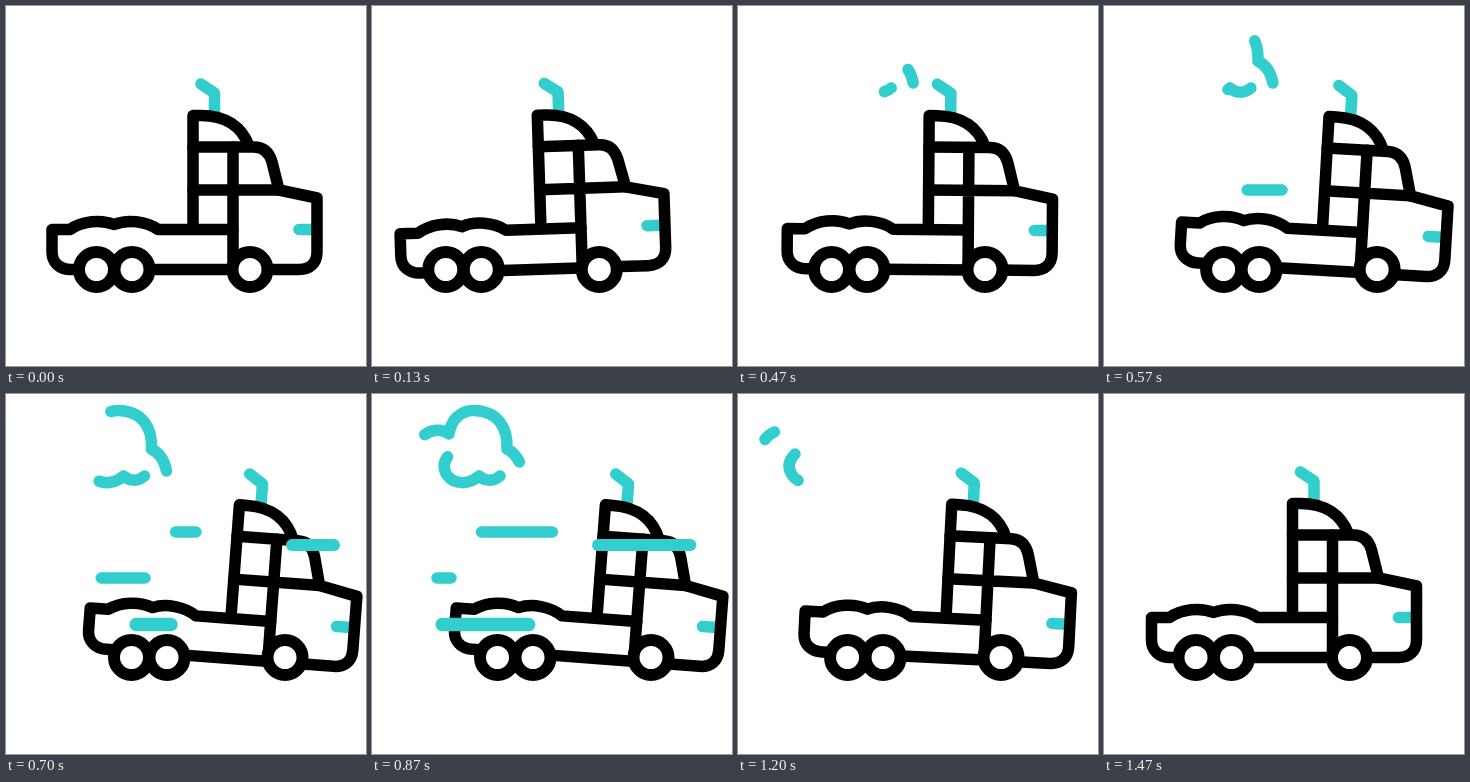
An HTML page that plays this animation: 360x360 px, repeating every 1670 ms.

```html
<!DOCTYPE html>
<html lang="en">
<head>
<meta charset="utf-8">
<title>Truck</title>
<style>
  html, body { margin: 0; width: 100%; height: 100%; overflow: hidden; background: #fff; }
  svg { display: block; width: 100vw; height: 100vh; }
  path, circle, line { fill: none; stroke-width: 11.5; stroke-linecap: round; stroke-linejoin: round; }
  .ink { stroke: #000; }
  .teal { stroke: #32cdcd; }
  .wheel { fill: #fff; stroke-width: 12; }
</style>
</head>
<body>
<svg viewBox="0 0 360 360">
  <g id="truck">
    <g id="body">
      <path class="teal" d="M195 78L208.500 87V106"/>
      <path class="teal" d="M293 223.500H308"/>
      <path class="ink" d="M187 223V109.500H195C220 109.500 236 121 243 140"/>
      <path class="ink" d="M187 141H248C258 141 263.500 147 266 156L273 184L311 192V246C311 257 304 263.500 293 263.500H256"/>
      <path class="ink" d="M187 184H273M227 141V263"/>
      <path class="ink" d="M72 263.500H65C53 263.500 46 256 46 246V223.500H64C76 215 95 213 108 218.500C121 213 140 215 152 223.500H227"/>
      <path class="ink" d="M140 263.500H232"/>
    </g>
    <circle class="ink wheel" cx="90.500" cy="263.500" r="17.500"/>
    <circle class="ink wheel" cx="126" cy="263.500" r="17.500"/>
    <circle class="ink wheel" cx="244" cy="263.500" r="17.500"/>
  </g>
  <g id="cloud">
    <path class="teal" id="puffTop" pathLength="1" d="M150 77C148 66 143 59 135 55C136 34 126 17 102 16.500C88 16.500 79 26 77 40C68 33 55 36 48 45.500"/>
    <path class="teal" id="puffLow" pathLength="1" d="M128 82C121 88 113 87 107 82C97 91 82 91 75 81C70 73 72 66 78 60"/>
  </g>
  <g id="wind"></g>
</svg>
<script>
const LOOP = 1670, STEP = 100 / 3, LAST = 44;
const $ = id => document.getElementById(id);
const clamp = x => Math.max(0, Math.min(1, x));
const span = (n, a, b) => clamp((n - a) / (b - a));
const smooth = p => p * p * (3 - 2 * p);

// Streaks: start x, end x, y, width, head start, tail start
const SPEED = 12;
const streaks = [
  [178, 65, 184, 11.5, 14.1, 17.75],
  [190, 70, 138, 11.5, 19.3, 25.2],
  [165, 40, 230.5, 13.5, 18.1, 25.3],
  [328, 215, 151, 12, 17.5, 25.2]
].map(([from, to, y, width, head, tail]) => {
  const el = document.createElementNS("http://www.w3.org/2000/svg", "line");
  el.setAttribute("class", "teal");
  el.style.strokeWidth = width;
  el.setAttribute("y1", y);
  el.setAttribute("y2", y);
  $("wind").append(el);
  return { el, from, to, head, tail };
});

function show(el, on) {
  el.setAttribute("visibility", on ? "visible" : "hidden");
}

function trim(el, start, end) {
  show(el, end > start);
  el.setAttribute("stroke-dasharray", `${Math.max(0, end - start)} 3`);
  el.setAttribute("stroke-dashoffset", -start);
}

function drawTruck(n) {
  const home = span(n, 31, 44);
  const x = -31 * smooth(span(n, 0, 7.6)) + 66 * smooth(span(n, 9, 18.8)) - 33.5 * smooth(home ** 0.76);
  const tilt = -3.1 * smooth(span(n, 0, 7)) + 7.4 * smooth(span(n, 9, 19.3)) - 4.3 * smooth(home);
  $("truck").setAttribute("transform", `translate(${x})`);
  $("body").setAttribute("transform", `rotate(${tilt} 175 262)`);
}

function drawCloud(n) {
  const grown = span(n, 12.7, 26.6);
  $("cloud").setAttribute("transform", `translate(${-2.1 * (n - 26)})`);
  trim($("puffTop"), span(n, 25.3, 36.9), grown);
  trim($("puffLow"), span(n, 28.7, 40.5), grown);
}

function drawWind(n) {
  for (const { el, from, to, head, tail } of streaks) {
    const at = begin => Math.max(to, from - SPEED * Math.max(0, n - begin));
    const left = at(head), right = at(tail);
    show(el, left < right);
    el.setAttribute("x1", left);
    el.setAttribute("x2", right);
  }
}

function render(ms) {
  const n = Math.min(LAST, Math.floor((ms + 3.4) / STEP));
  drawTruck(n);
  drawCloud(n);
  drawWind(n);
}

const began = performance.now();
function tick() {
  render((performance.now() - began) % LOOP);
  requestAnimationFrame(tick);
}
render(0);
requestAnimationFrame(tick);
</script>
</body>
</html>
```
